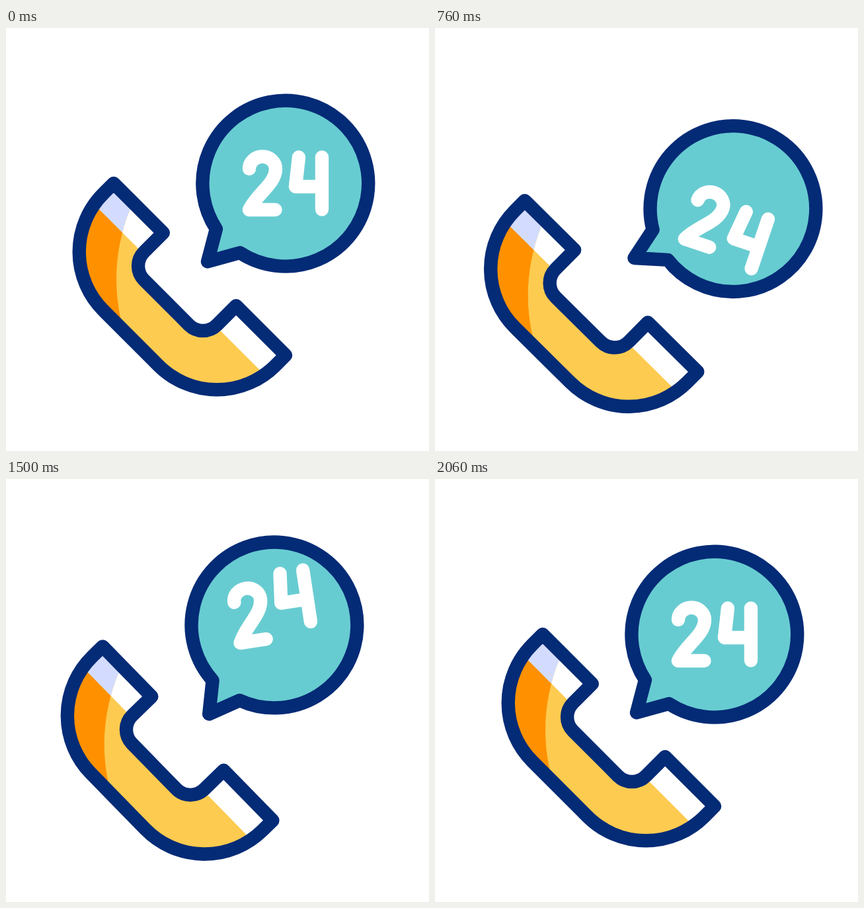
Animation of 640 by 640 pixels, one loop 2.22 s. Source, as an HTML page:

```html
<!DOCTYPE html>
<html lang="en">
<head>
<meta charset="utf-8">
<title>Round-the-clock call</title>
<style>
  html, body { margin: 0; width: 100%; height: 100%; overflow: hidden; background: #fff; }
  svg { display: block; width: 100vw; height: 100vh; }
  .line, .digit { fill: none; stroke-width: 20.4; stroke-linejoin: round; }
  .line { stroke: #042b76; }
  .digit { stroke: #fff; stroke-linecap: round; }
</style>
</head>
<body>
<svg viewBox="0 0 640 640">
  <defs>
    <path id="body" d="M-184-110V-88A125 125 0 0 0-59 37H59A125 125 0 0 0 184-88V-110H78V-69A30 30 0 0 1 48-39H-48A30 30 0 0 1-78-69V-110Z"/>
    <clipPath id="inBody"><use href="#body"/></clipPath>
    <clipPath id="inLight"><circle cx="118" cy="-207" r="278"/></clipPath>
  </defs>

  <g id="phone">
    <g clip-path="url(#inBody)">
      <path fill="#ff9100" d="M-200-130H200V60H-200Z"/>
      <path fill="#d3dcfe" d="M-200-130H200V-66.5H-200Z"/>
      <g clip-path="url(#inLight)">
        <path fill="#fdcb50" d="M-200-130H200V60H-200Z"/>
        <path fill="#fff" d="M-200-130H200V-66.5H-200Z"/>
      </g>
    </g>
    <use href="#body" class="line"/>
  </g>

  <g id="bubble">
    <path class="line" style="fill:#67ccd1" d="M318 304A125.4 125.4 0 1 1 354 340L305 353.5Z"/>
    <path id="two" class="digit" d="M368 213A20 18.5 0 0 1 408 213C408 236 380 250 368 275H407.5"/>
    <path id="four" class="digit" d="M443 195.5L438 240H478M478 195.5V274.5"/>
  </g>
</svg>
<script>
  const LOOP = 2220, STEP = 20;
  const RETURN = 1242;      // the phone comes back after this long
  const FOUR_DELAY = 198;   // the second digit trails the first

  // Sine ease through evenly spaced poses, one per beat, holding at both ends.
  function glide(poses, beat, t) {
    const last = poses.length - 1;
    const pos = Math.min(Math.max(t / beat, 0), last);
    const i = Math.min(Math.floor(pos), last - 1);
    const ease = (1 - Math.cos(Math.PI * (pos - i))) / 2;
    return poses[i] + (poses[i + 1] - poses[i]) * ease;
  }

  const slide = t => glide([0, 26], 745, t);
  const ring = t => glide([0, 32, -30, 19, -18, 0], 147, t - 37);
  const sway = t => glide([0, 20, -10, 0], 669, t);
  const bob = t => glide([0, 38, -38, 0], 607, t);

  const place = (id, value) =>
    document.getElementById(id).setAttribute("transform", value);

  function draw(t) {
    const shift = slide(t) - slide(t - RETURN);
    const turn = 45 + ring(t) + ring(t - RETURN);
    place("phone", `translate(${215.2 - shift} ${442.8 + shift}) rotate(${turn})`);
    place("bubble", `rotate(${sway(t)} 320 340)`);
    place("two", `translate(0 ${bob(t)})`);
    place("four", `translate(0 ${bob(t - FOUR_DELAY)})`);
  }

  const start = performance.now();
  function tick() {
    const t = (performance.now() - start) % LOOP;
    draw(Math.floor(t / STEP) * STEP);
    requestAnimationFrame(tick);
  }
  tick();
</script>
</body>
</html>
```
